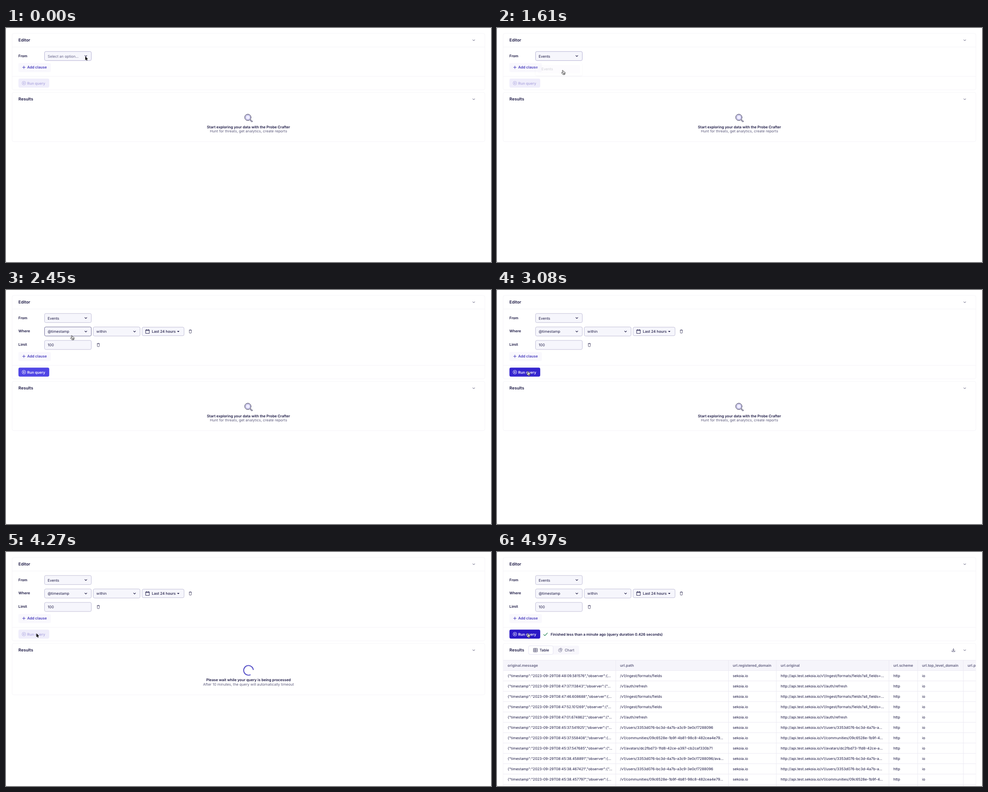
Write an HTML page that moves like this. It is 1076 by 520 pixels and loops after 6.16 s.

```html
<!DOCTYPE html>
<html lang="en">
<head>
<meta charset="utf-8">
<title>Query editor</title>
<style>
  html, body { margin: 0; width: 100%; height: 100%; overflow: hidden; background: #fff; }
  svg { display: block; }
  text { font: 400 8.08px Inter, "Open Sans", sans-serif; fill: #1a1743; text-rendering: geometricPrecision; white-space: pre; }
  .b { font-weight: 600; }
  .m { font-weight: 500; }
  .h { font-weight: 600; font-size: 9.2px; }
  .log { font-size: 7.96px; }
  .mid { text-anchor: middle; }
  .soft { fill: #5f5d7e; }
  .line { fill: none; stroke: #1a1743; stroke-linecap: round; stroke-linejoin: round; }
  .field { fill: #f6f6fc; stroke: #bbb9d4; stroke-width: .9; }
  .edge { fill: none; stroke: #f5f4f8; }
  .grid { fill: none; stroke: #eceaf3; }
</style>
</head>
<body>
<svg id="stage" width="1076" height="520" viewBox="0 0 1076 520"></svg>
<script>
const LOOP = 6160, STEP = 70;
const stage = document.getElementById('stage');

function add(parent, tag, attrs = {}, label) {
  const el = document.createElementNS('http://www.w3.org/2000/svg', tag);
  for (const k in attrs) el.setAttribute(k, attrs[k]);
  if (label !== undefined) el.textContent = label;
  return parent.appendChild(el);
}
const group = (p, attrs) => add(p, 'g', attrs);
const box = (p, x, y, w, h, attrs) => add(p, 'rect', { x, y, width: w, height: h, ...attrs });
const path = (p, d, attrs) => add(p, 'path', { d, class: 'line', ...attrs });
// y is the middle of the capital letters
const text = (p, x, y, label, cls = '') => add(p, 'text', { x, y: y + 2.9, class: cls }, label);
const chevron = (p, x, y, r = 2.2, w = 1.1) =>
  path(p, `M${x - r} ${y - r / 2}l${r} ${r}l${r} ${-r}`, { 'stroke-width': w });
const show = (el, on) => el.setAttribute('visibility', on ? 'visible' : 'hidden');
const shift = (el, x, y) => el.setAttribute('transform', `translate(${x} ${y})`);

function field(p, x, y, label) {
  const frame = box(p, x, y, 103.8, 20.2, { rx: 3, class: 'field' });
  const caption = text(p, x + 7, y + 10.4, label);
  return { frame, caption };
}
function select(p, x, y, label) {
  const f = field(p, x, y, label);
  chevron(p, x + 91.6, y + 10.1);
  return f;
}
function trash(p, x, y) {
  path(p, `M${x - 2.7} ${y - 2.9}h5.4M${x - 1} ${y - 3.8}h2M${x - 2.2} ${y - 2.9}v5.6q0 .9 .9 .9h2.6q.9 0 .9 -.9v-5.6`, { 'stroke-width': .7 });
}

// Window corners
box(stage, 0, 0, 1, 1, { fill: '#c4c4c8' });
box(stage, 0, 519, 1, 1, { fill: '#c4c4c8' });

// Editor
const editor = box(stage, 13.5, 12, 1049, 125.5, { rx: 4, class: 'edge' });
text(stage, 27.6, 27.4, 'Editor', 'h');
chevron(stage, 1037.7, 27.2, 2.2, .8);
path(stage, 'M14 42.2H1062', { class: 'edge' });
text(stage, 27.6, 61.6, 'From', 'b');
const from = select(stage, 85.5, 52.2, '');

const clauses = group(stage);
text(clauses, 27.6, 91.5, 'Where', 'b');
const stamp = select(clauses, 85.5, 82.1, '@timestamp');
select(clauses, 193.6, 82.1, 'within');
box(clauses, 302, 82.6, 93, 19, { rx: 3, class: 'field' });
path(clauses, 'M310.2 88.8h7.8v7.6h-7.8zM310.2 90.2h7.8M312 87.4v1.4M316.2 87.4v1.4', { 'stroke-width': .9 });
text(clauses, 323.6, 92.5, 'Last 24 hours', 'm');
add(clauses, 'path', { d: 'M379.6 91h5.2l-2.6 2.7z', fill: '#1a1743' });
trash(clauses, 409, 92.2);
text(clauses, 27.6, 121.5, 'Limit', 'b');
field(clauses, 85.5, 112, '100');
trash(clauses, 204.8, 122.2);

const foot = group(stage);
box(foot, 27.5, 77.7, 72, 20, { rx: 3, fill: '#f9f8fd' });
path(foot, 'M36.7 87.4h6M39.7 84.4v6', { style: 'stroke:#473bbd', 'stroke-width': 1 });
text(foot, 47, 87.4, 'Add clause', 'b').style.fill = '#473bbd';
path(foot, 'M14 107.5H1062', { class: 'edge' });
const button = box(foot, 27.6, 112.5, 68.3, 20, { rx: 3.4 });
const label = group(foot);
add(label, 'circle', { cx: 39.7, cy: 122.5, r: 4, fill: 'none', stroke: 'currentColor', 'stroke-width': .9 });
add(label, 'path', { d: 'M38.5 120.5v4l3.2 -2z', fill: 'currentColor' });
text(label, 47, 122.6, 'Run query', 'b').style.fill = 'currentColor';

// Results
const results = group(stage);
const panel = box(results, 13.5, 143, 1049, 109.5, { rx: 4, class: 'edge' });
text(results, 27.6, 158.4, 'Results', 'h');
chevron(results, 1037.7, 158.3, 2.2, .8);

const intro = group(results);
add(intro, 'circle', { cx: 536.6, cy: 198.6, r: 7, fill: '#fff', class: 'line', 'stroke-width': 1 });
add(intro, 'circle', { cx: 536.6, cy: 198.6, r: 5, fill: '#f1efff', stroke: '#6a62c4', 'stroke-width': .8 });
path(intro, 'M541.7 203.7l1 1M542.1 205.3l1.3 -1.3l3.1 3.1q.5 1.8 -1.3 1.3z', { 'stroke-width': 1 });
text(intro, 538, 219.6, 'Start exploring your data with the Probe Crafter', 'b mid');
text(intro, 538, 229.4, 'Hunt for threats, get analytics, create reports', 'soft mid');

const wait = group(stage);
const spinner = add(wait, 'circle', {
  cx: 538, cy: 263, r: 10.7, fill: 'none', stroke: '#5a54c9', 'stroke-width': 2.2,
  pathLength: 360, 'stroke-dasharray': '290 70'
});
text(wait, 538, 284.2, 'Please wait while your query is being processed', 'b mid');
text(wait, 538, 294, 'After 10 minutes, the query will automatically timeout', 'soft mid');

// Finished query
const done = group(stage);
path(done, 'M103.4 183.2l2.7 2.8l5.8 -6', { style: 'stroke:#2f8a5b', 'stroke-width': 1.1 });
text(done, 119, 182.8, 'Finished less than a minute ago (query duration 0.426 seconds)', 'b');
box(done, 70, 208, 112, 20, { rx: 3, fill: '#f8f7fc' });
box(done, 70, 208.4, 54.5, 19.2, { rx: 3, fill: '#fff', stroke: '#e6e4f3' });
path(done, 'M81.3 214.2h8v7.8h-8zM81.3 216.8h8M81.3 219.4h8M84.8 214.2v7.8', { 'stroke-width': .7 });
text(done, 94.4, 218.2, 'Table', 'm');
path(done, 'M139.6 214.4a3.9 3.9 0 1 0 4.4 4.6h-4.4zM141.3 213.7v3.6h3.6a3.6 3.6 0 0 0 -3.6 -3.6z', { style: 'stroke:#5f5d7e', 'stroke-width': .7 });
text(done, 150.2, 218.2, 'Chart', 'm soft');
path(done, 'M1012.6 214.4v4.8M1010.6 217.4l2 2l2 -2M1009.4 219.6v1.8h6.4v-1.8', { 'stroke-width': .75 });

const clip = add(add(stage, 'defs'), 'clipPath', { id: 'table' });
box(clip, 14, 240, 1048, 280);
const table = group(done, { 'clip-path': 'url(#table)' });
const columns = [
  [14, 'original.message'], [263.5, 'url.path'], [513.5, 'url.registered_domain'], [619.7, 'url.original'],
  [869.6, 'url.scheme'], [933.4, 'url.top_level_domain'], [1034.5, 'url.port']
];
const fields = '/v1/ingest/formats/fields', refresh = '/v1/auth/refresh';
const user = '/v1/users/3353d076-bc3d-4a7b-a3c9-3e0cf7288096';
const community = '/v1/communities/09c6528e-1b9f-4b81-98c8-482cea4e79…';
const avatar = '/v1/avatars/dc2fbd73-1fd8-42ce-a397-cb2caf330b71';
const query = fields + '?all_fields=…';
const cut = (s, n) => s.slice(0, n) + '…';
// time, tail of the message, path, path in the full address
const rows = [
  ['48:09.581576', '', fields, query],
  ['47:37.113843', '"', refresh, refresh],
  ['47:46.608688', '', fields, query],
  ['47:52.101269', '"', fields, query],
  ['47:01.674862', '"', refresh, refresh],
  ['45:37.541925', '"', user, cut(user, 30)],
  ['45:37.558408', '', community, cut(community, 31)],
  ['45:37.547685', '"', avatar, cut(avatar, 32)],
  ['45:38.458891', '', user + '/ava…', cut(user, 30)],
  ['45:38.467421', '"', user, cut(user, 30)],
  ['45:38.457797', '', community, cut(community, 31)]
];
box(table, 14, 240.5, 1048, 23, { fill: '#f6f5fb' });
path(table, 'M14 240.5H1062M14 263.5H1062', { class: 'grid' });
columns.forEach(([x, name], i) => {
  text(table, x + 9.6, 252.3, name, 'b soft');
  if (i) path(table, `M${x} 241V520`, { class: 'grid' });
});
rows.forEach(([time, tail, route, full], r) => {
  const y = 275 + r * 23;
  const cells = [
    `{"timestamp":"2023-09-29T08:${time}","observer":{${tail}…`, route, 'sekoia.io',
    'http://api.test.sekoia.io' + full, 'http', 'io'
  ];
  cells.forEach((cell, i) => text(table, columns[i][0] + 9.6, y, cell, i ? '' : 'log'));
  path(table, `M14 ${y + 11.5}H1062`, { class: 'grid' });
});

// Drop-down menu
const menu = group(stage);
menu.style.filter = 'drop-shadow(0 1px 1.5px rgba(40,30,110,.25))';
box(menu, 85.5, 77.8, 103.5, 27.6, { rx: 3, fill: '#fff' });
box(menu, 90.5, 82, 93.5, 19, { rx: 3, fill: '#f6f5fb' });
text(menu, 98.8, 91.5, 'Events');

// Pointer, drawn from its hot spot
const pointer = group(stage);
const arrow = path(pointer, 'M0 0V8.4L1.9 6.7L3.2 9.6L4.6 9L3.4 6.1H6Z', { style: 'fill:#000;stroke:#fff', 'stroke-width': .7, 'paint-order': 'stroke' });
const hand = path(pointer,
  'M-.4 .8C-.5 -.5 1.3 -.6 1.5 .7L2 3.4C2.5 2.9 3.4 3 3.6 3.7C4.1 3.2 4.9 3.5 5 4.1C5.6 3.8 6.1 4.2 6.1 4.8L5.9 7.2C5.8 8.2 5.2 8.6 5.2 9.6H1C.8 8.7 -1.2 7.2 -2 5.8C-2.4 5 -1.4 4.4 -.7 5.1L.3 5.9Z' +
  'M2.2 6.2v1.8M3.5 6.2v1.8M4.7 6.2v1.8', { style: 'fill:#fff;stroke:#111', 'stroke-width': .75 });

// time, x, y, hand
const moves = [
  [0, 175.9, 63, 0], [840, 174, 64, 1], [910, 170, 69, 1], [980, 166, 76, 1], [1050, 161, 83, 1],
  [1120, 156.6, 88, 1], [1190, 150, 92, 1], [1260, 145.2, 94, 1],
  [2450, 145.2, 101.2, 1], [2520, 142, 109, 0], [2590, 134, 122, 0], [2660, 122, 138, 0], [2730, 107, 153, 0],
  [2800, 94, 165, 0], [2870, 82, 174, 1], [2940, 73, 178.5, 1], [3010, 67.7, 180.4, 1],
  [3570, 67.5, 180.8, 0], [4970, 67.7, 180.4, 1]
];

// Button colours: time, fill and label
const off = ['#efedfb', '#b2ace1'], on = ['#5046e5', '#fff'], over = ['#2a18c6', '#fff'];
const looks = [
  [0, off], [1610, off], [2110, on], [2870, on], [3370, over],
  [3570, over], [4070, off], [4970, off], [4970, over], [LOOP, over]
];
function fade(el, prop, i) {
  const frames = looks.map(([t, c]) => ({ offset: t / LOOP, [prop]: c[i], easing: 'ease' }));
  const a = el.animate(frames, { duration: LOOP, fill: 'both' });
  a.pause();
  return a;
}
const fades = [fade(button, 'fill', 0), fade(label, 'color', 1)];

function draw(t) {
  const chosen = t >= 1540, grown = t >= 1960;
  const ended = t >= 4970, waiting = t >= 3570 && !ended;
  const dy = grown ? 60 : 0;

  from.caption.textContent = chosen ? 'Events' : 'Select an option...';
  from.caption.style.fill = chosen ? '' : '#67658a';
  from.frame.style.stroke = grown ? '' : '#aeabd0';
  stamp.frame.style.stroke = t >= 2450 && t < 2590 ? '#66638f' : '';

  const opening = t >= 420 && t < 560;
  show(menu, t >= 420 && t < 1680);
  menu.style.opacity = opening ? .5 : t < 1540 ? 1 : t < 1610 ? .6 : .2;
  shift(menu, opening ? 2 : 0, opening ? -28.6 : 0);

  show(clauses, grown);
  shift(foot, 0, dy);
  shift(results, 0, dy);
  editor.setAttribute('height', 125.5 + dy);
  panel.setAttribute('height', ended ? 400 : waiting ? 114.5 : 109.5);
  show(intro, t < 3570);
  show(wait, waiting);
  show(done, ended);
  spinner.setAttribute('transform', `rotate(${65 + (t - 4270) * .36} 538 263)`);
  // a hair past the step, so that hard changes count on their own step
  for (const a of fades) a.currentTime = t + .5;

  const [, x, y, isHand] = moves.filter(m => m[0] <= t).pop();
  shift(pointer, x, y);
  show(arrow, !isHand);
  show(hand, isHand);
}

const start = performance.now();
function tick() {
  const t = (performance.now() - start) % LOOP;
  draw(Math.floor(t / STEP) * STEP);
  requestAnimationFrame(tick);
}
tick();
</script>
</body>
</html>
```
